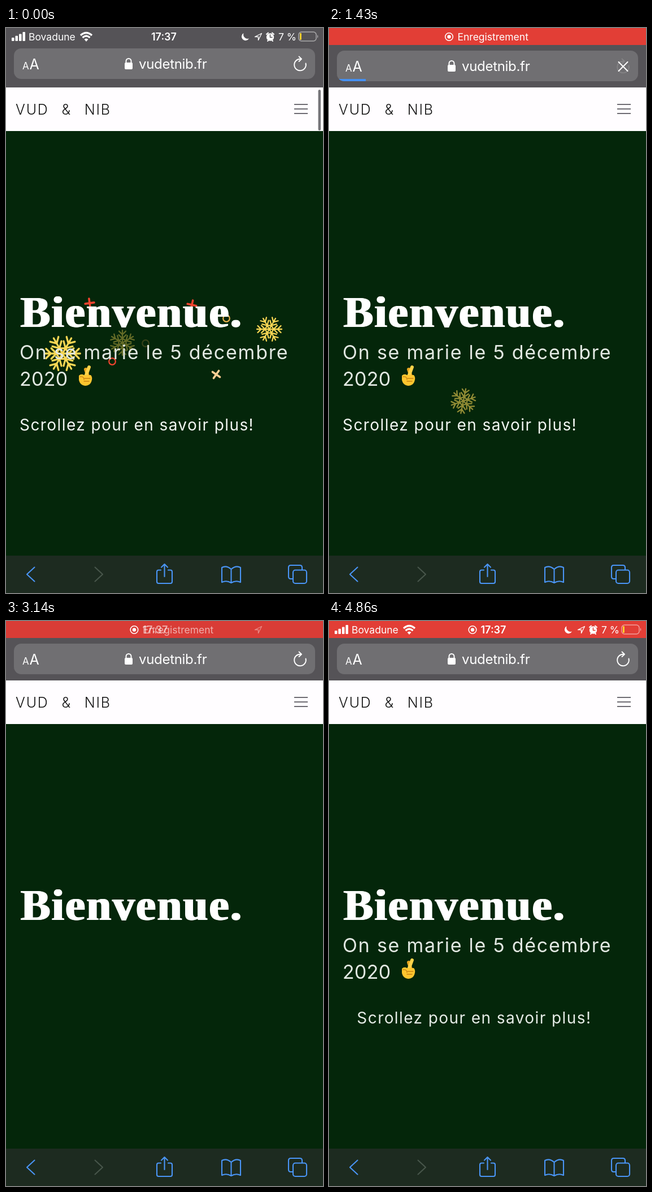
An HTML page that plays this animation: 561 px wide and 998 px high, repeating every 5.01 s.

```html
<!DOCTYPE html>
<html lang="fr">
<head>
<meta charset="utf-8">
<title>Bienvenue</title>
<style>
  html, body { margin: 0; width: 100%; height: 100%; overflow: hidden; background: #04260a; }
  svg { display: block; width: 100vw; height: 100vh; }
  text { font-family: Inter, "Open Sans", sans-serif; fill: #fff; white-space: pre; }
  .line { fill: none; stroke-linecap: round; stroke-linejoin: round; }
  .title { font: 700 78px "Liberation Serif", "Noto Serif", serif; letter-spacing: 2.7px; }
  .date { font-size: 34px; fill: #e2e8e2; }
  .status { font-size: 17.5px; }
  .clock { font-size: 18px; font-weight: 600; }
</style>
</head>
<body>
<svg viewBox="0 0 561 998" preserveAspectRatio="none">
  <defs>
    <path id="arm" d="M0 0V-22M-6-20.5L0-14.5L6-20.5M-6.5-14L0-7.5L6.5-14M0-7.5L6.5-3.8"/>
    <g id="flake" class="line" stroke-width="2.3"></g>
    <path id="plus" class="line" d="M-8 0H8M0-8V8" stroke-width="3.6"/>
    <circle id="ring" class="line" r="5.8" stroke-width="2.2"/>
    <path id="chevron" class="line" d="M6.5-12.5L-7 0L6.5 12.5"/>
    <path id="rule" d="M510 0H534" stroke="#4a4951" stroke-width="1.6"/>
    <clipPath id="field"><rect x="14" y="40" width="533" height="54" rx="13"/></clipPath>
  </defs>

  <rect width="561" height="998" fill="#04260a"/>
  <g id="confetti"></g>

  <g id="heading">
    <!-- offset copies thicken the stems but keep the serifs thin -->
    <text id="welcome" class="title" x="24.500" y="528">Bienvenue.</text>
    <use href="#welcome" x="1.500"/>
    <use href="#welcome" x="3"/>
  </g>
  <g id="date">
    <text class="date" x="24" y="585" letter-spacing="1.75">On se marie le 5 décembre</text>
    <text class="date" x="24" y="632" letter-spacing=".3">2020</text>
    <g class="line" stroke-width="6">
      <path d="M145 615L141 603" stroke="#e8a520"/>
      <path d="M140 618L147 599" stroke="#ffd34a"/>
    </g>
    <path d="M129 614Q133 610 138 613H150Q154 617 151 625Q148 632 140 632Q131 631 129 622Z" fill="#fdc52f"/>
    <path class="line" d="M131 616Q138 615 138 621M139 619H149M138 624H147" stroke="#c98213" stroke-width="1.3"/>
  </g>
  <g id="scroll"><text x="24" y="711" font-size="28" letter-spacing="1.42" style="fill:#f2f6f2">Scrollez pour en savoir plus!</text></g>

  <rect y="104" width="561" height="78" fill="#fffdff"/>
  <text x="17" y="153" font-size="25" font-weight="300" letter-spacing="1.8" word-spacing="14" style="fill:#151515">VUD &amp; NIB</text>
  <use href="#rule" y="135"/>
  <use href="#rule" y="143"/>
  <use href="#rule" y="151"/>
  <rect id="scrollbar" x="552.500" y="109" width="4.500" height="72" rx="2.200" fill="#77767a"/>

  <rect width="561" height="105" fill="#555357"/>
  <g id="address">
    <rect x="14" y="40" width="533" height="54" rx="13" fill="#706f72"/>
    <text x="29" y="77" font-size="17">A</text>
    <text x="41.500" y="77" font-size="25">A</text>
    <rect x="210" y="65" width="14" height="12" rx="2" fill="#fff"/>
    <path d="M212.500 66V62.500a4.500 4.500 0 0 1 9 0V66" fill="none" stroke="#fff" stroke-width="2"/>
    <text x="235" y="76" font-size="24" letter-spacing="-.3">vudetnib.fr</text>
    <path id="reload" class="line" d="M530.500 66.500A10.300 10.300 0 1 1 521 58.700M518.500 54.500L523 58.700L518.500 63" stroke="#fff" stroke-width="1.9"/>
    <path id="stop" class="line" d="M-8-8L8 8M8-8L-8 8" stroke="#fff" stroke-width="2"/>
    <g clip-path="url(#field)"><rect id="progress" x="14" y="90" height="4" fill="#4590f2"/></g>
  </g>

  <rect id="alert" width="561" height="30"/>
  <g id="carrier" fill="#fff">
    <g id="signal"></g>
    <text class="status" x="40" y="22">Bovadune</text>
    <path d="M132 13Q142 4 152 13M135.500 17Q142 11 148.500 17" fill="none" stroke="#fff" stroke-width="3.300"/>
    <path d="M138.500 20Q142 17 145.500 20L142 24Z"/>
    <path d="M420.500 9A7 7 0 1 0 430 18.500A7.500 7.500 0 0 1 420.500 9Z"/>
    <circle cx="467.500" cy="16" r="6.700"/>
    <path class="line" d="M461 11L464 8.500M474 11L471 8.500M463 23L464.500 21.500M472 23L470.500 21.500" stroke="#fff" stroke-width="2"/>
    <path id="hands" class="line" d="M467.500 12V16.500H471" stroke-width="1.500"/>
    <text class="status" x="482" y="22">7 %</text>
    <rect x="518" y="7" width="31" height="16" rx="5" fill="none" stroke="#fff" stroke-opacity=".5" stroke-width="1.500"/>
    <path d="M551 12Q553.500 15 551 18Z" fill-opacity=".6"/>
    <rect x="520" y="9" width="2.800" height="12" rx="1.200" fill="#ffd52e"/>
  </g>
  <path id="arrow" class="line" d="M452.500 9.500L440.500 15.500H446.500V21.500Z" stroke="#fff" stroke-width="1.300"/>
  <text id="clock" class="clock" x="257" y="22">17:37</text>
  <g id="recording">
    <circle cy="15.500" r="6.800" fill="none" stroke="#fff" stroke-width="1.600"/>
    <circle cy="15.500" r="3.200" fill="#fff"/>
    <text id="recLabel" class="status" x="15" y="21.500">Enregistrement</text>
    <text id="recClock" class="clock" x="14.500" y="22">17:37</text>
  </g>

  <rect y="932" width="561" height="66" fill="#1d2b20"/>
  <g class="line" stroke="#4a95f6" stroke-width="2.100">
    <use href="#chevron" x="44" y="965"/>
    <use href="#chevron" stroke="#48564b" transform="translate(164 965) scale(-1 1)"/>
    <path d="M274 957.500H270q-3 0-3 3V978q0 3 3 3H291q3 0 3-3V960.500q0-3-3-3H287M280.500 969V947.500M275 952.500L280.500 947L286 952.500"/>
    <path d="M398.500 956Q390 948.500 382 953V979Q390 975 398.500 980Q407 975 415 979V953Q407 948.500 398.500 956V980"/>
    <path d="M507.500 973H504q-4 0-4-4V953q0-4 4-4H520q4 0 4 4V957"/>
    <rect x="508" y="957.500" width="24" height="23.500" rx="4"/>
  </g>
</svg>
<script>
const LOOP = 5010, STEPS = 35, STEP = 142.9;
const TAP = 1250, LOADED = 2860, BAR = 533;
const NS = "http://www.w3.org/2000/svg";
const el = id => document.getElementById(id);
const clamp = v => Math.min(1, Math.max(0, v));
const set = (node, attrs) => { for (const k in attrs) node.setAttribute(k, attrs[k]); };
const fade = (id, v) => set(el(id), { opacity: clamp(v) });

function add(parent, tag, attrs) {
  const node = document.createElementNS(NS, tag);
  set(node, attrs);
  el(parent).append(node);
  return node;
}

for (let a = 0; a < 360; a += 60) add("flake", "use", { href: "#arm", transform: `rotate(${a})` });
for (let i = 0; i < 4; i++) {
  const height = 6 + 3.3 * i;
  add("signal", "rect", { x: 10 + 6.5 * i, y: 23 - height, width: 4.5, height, rx: 1 });
}

// x and y are the place at the start of the loop; birth and death bound the fade.
function piece(shape, stroke, x, y, options) {
  const node = add("confetti", "use", { href: "#" + shape, stroke });
  return { node, x, y, size: 1, turn: 0, fall: 155, birth: -650, death: 650, ...options };
}

const GOLD = "#f8d654", RED = "#f2442f";
const pieces = [
  piece("flake", GOLD, 100, 575, { size: 1.42, turn: 30 }),
  piece("flake", GOLD, 466, 532, { turn: 30, fall: 185, death: 1250 }),
  piece("flake", GOLD, 206, 556, { fall: 130, birth: -250, death: 1800 }),
  piece("plus", RED, 148, 486, { turn: -8 }),
  piece("plus", RED, 329, 489, { turn: 12 }),
  piece("plus", "#ffd095", 372, 612, { turn: 35 }),
  piece("ring", "#e8b04c", 390, 513),
  piece("ring", "#36421a", 247, 557),
  piece("ring", RED, 188, 589),
  piece("ring", "#8f7d30", 110, 510, { birth: 450, death: 1150 }),
];

// Pieces drift right and fall against drag, fading in and out.
function drawPiece(p, t) {
  const s = t / 1000, drag = 1 - Math.exp(-1.1 * s);
  const age = (t - p.birth) / (p.death - p.birth);
  const x = p.x + 40 * drag, y = p.y + p.fall * drag;
  set(p.node, {
    transform: `translate(${x} ${y}) rotate(${p.turn + 8 * s}) scale(${p.size})`,
    opacity: clamp(1.6 * (1 - Math.abs(2 * age - 1))),
  });
}

// cubic-bezier(.25, .1, .25, 1)
function ease(x) {
  x = clamp(x);
  const curve = (s, a, b) => 3 * s * (1 - s) ** 2 * a + 3 * s * s * (1 - s) * b + s ** 3;
  let lo = 0, hi = 1;
  for (let i = 0; i < 20; i++) {
    const mid = (lo + hi) / 2;
    if (curve(mid, .25, .25) < x) lo = mid; else hi = mid;
  }
  return curve(lo, .1, 1);
}

function slideIn(id, t, start) {
  const p = t < 2000 ? 1 : ease((t - start) / 1000);
  set(el(id), { transform: `translate(${510 * (1 - p)} 0)`, opacity: p });
}

function drawStatus(t) {
  const recording = t > 100;
  const swap = clamp((t - 3050) / 270);
  const pulse = ((1 + Math.cos((t - 2000) / 2280 * 2 * Math.PI)) / 2) ** 2;
  const mix = (a, b) => Math.round(a + (b - a) * pulse);
  const color = recording ? `rgb(${mix(217, 255)},${mix(60, 68)},${mix(54, 56)})` : "#555357";
  set(el("alert"), { fill: color });
  set(el("hands"), { stroke: color });
  set(el("arrow"), { fill: recording ? "none" : "#fff" });
  set(el("recording"), { transform: `translate(${212.5 + 41.5 * swap} 0)` });
  fade("carrier", recording ? 2 * swap - 1 : 1);
  fade("arrow", recording ? swap * 1.2 : 1);
  fade("clock", recording ? 0 : 1);
  fade("recording", recording ? 1 : 0);
  fade("recLabel", 1 - swap * 1.2);
  fade("recClock", swap * 1.6);
}

function drawAddress(t) {
  const loading = t > TAP && t < 2680;
  const size = 1 - .42 * clamp((t - 2440) / 130);
  // A slow crawl, then a rush to the end.
  const crawl = .128 * (t - 1030), rush = BAR - 1.16 * (LOADED - t);
  set(el("address"), { transform: `translate(0 ${t < TAP ? -4 : 0})` });
  set(el("stop"), { transform: `translate(520.5 68) scale(${size})` });
  set(el("progress"), { width: Math.min(BAR, Math.max(0, crawl, rush)) });
  fade("progress", t < TAP ? 0 : (LOADED + 190 - t) / 190);
  fade("reload", loading ? (1500 - t) / 500 : 1);
  fade("stop", loading ? 1 - clamp((t - 2450) / 300) : 0);
}

function draw(t) {
  for (const p of pieces) drawPiece(p, t);
  slideIn("heading", t, 2168);
  slideIn("date", t, 3152);
  slideIn("scroll", t, 4136);
  fade("scrollbar", 1 - (t - 200) / 300);
  drawStatus(t);
  drawAddress(t);
}

const begin = performance.now();
function tick() {
  const t = (performance.now() - begin) % LOOP;
  draw(Math.min(STEPS - 1, Math.floor((t + 6) / STEP)) * STEP);
  requestAnimationFrame(tick);
}
tick();
</script>
</body>
</html>
```
